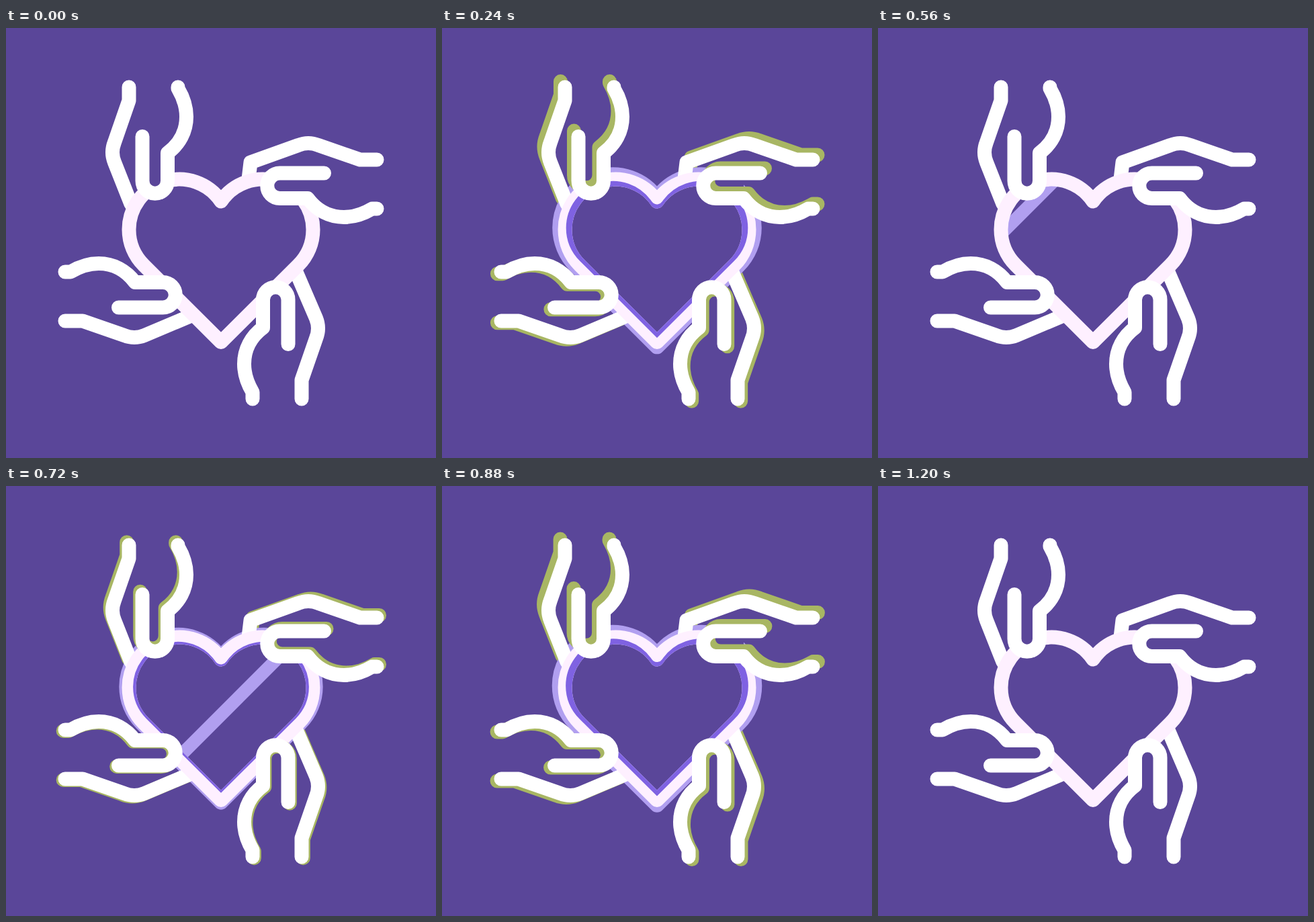
Write an HTML page that moves like this. It is 640 px wide and 640 px high and loops after 1.4 s.

```html
<!DOCTYPE html>
<html lang="en">
<head>
<meta charset="utf-8">
<title>Hands around a heart</title>
<style>
  html, body { margin: 0; width: 100%; height: 100%; overflow: hidden; background: #5a4699; }
  svg { display: block; width: 100%; height: 100%; }
  .line { fill: none; stroke-width: 21; stroke-linecap: round; stroke-linejoin: round; }
  .ghost { stroke: #a8b663; }
  .hand { stroke: #fff; }
  .pocket { fill: #5a4699; }
</style>
</head>
<body>
<svg viewBox="0 0 640 640">
  <defs>
    <path id="heart" d="M320 258A75 75 0 0 0 183 300A75 75 0 0 0 205 353L320 467.5L435 353A75 75 0 0 0 457 300A75 75 0 0 0 320 258Z"/>
    <clipPath id="inside"><use href="#heart"/></clipPath>
    <mask id="hollow" maskUnits="userSpaceOnUse" x="0" y="0" width="640" height="640">
      <use id="rim" class="line grow" href="#heart" style="fill:#fff;stroke:#000"/>
    </mask>
  </defs>
  <g id="armGhosts"></g>
  <use class="line grow echo" href="#heart" stroke="#b19ff0"/>
  <g clip-path="url(#inside)">
    <path id="shine" d="M-400 400L400 -400L413.5 -386.5L-386.5 413.5Z" fill="#b19ff0"/>
  </g>
  <g id="arms"></g>
  <use class="line" href="#heart" stroke="#fef0ff"/>
  <g mask="url(#hollow)"><use class="line echo" href="#heart" stroke="#7f62e2"/></g>
  <g id="palms"></g>
</svg>
<script>
const LOOP = 1400, STEP = 40;
const $ = id => document.getElementById(id);
const all = sel => [...document.querySelectorAll(sel)];

// One hand shape, placed four times; reach lengthens the wrist, push is the pulse direction.
const hands = [
  { place: '1 0 0 1 0 0', reach: 0, push: [-7, -9] },
  { place: '0 1 -1 0 640 13', reach: 5, push: [7.5, -7.5], bent: true },
  { place: '0 -1 1 0 0 619', reach: 6, push: [-6, 3] },
  { place: '-1 0 0 -1 623 640', reach: 8, push: [5, 3.5] }
];

const armPath = ({ reach: r, bent }) =>
  `M183 88V${108 + r}L161.5 ${170 + r}Q155.5 ${185 + r} 161.5 ${200 + r}` +
  (bent ? 'L187 276L212 279' : `L${186 + r * 0.7} ${262 + r * 2}`);

const palmPath = ({ reach: r }) =>
  `M256 88V${90 + r}Q268.5 ${111 + r} 268.5 ${132 + r}` +
  `C268.5 ${154 + r} 258 ${173 + r} 240.5 ${186 + r}` +
  `V${227.5 + r}A18.75 18.75 0 0 1 203 ${227.5 + r}V${161.5 + r}`;

const pocketPath = ({ reach: r }) =>
  `M203 ${186 + r}H240.5V${227.5 + r}A18.75 18.75 0 0 1 203 ${227.5 + r}Z`;

const placed = (h, d, cls) => `<path class="${cls}" transform="matrix(${h.place})" d="${d}"/>`;

const layer = (kind, shape) => hands.map((h, i) =>
  `<g class="${kind}" data-hand="${i}">${placed(h, shape(h), 'line')}</g>`).join('');

$('armGhosts').innerHTML = layer('ghost', armPath);
$('arms').innerHTML = layer('hand', armPath);
$('palms').innerHTML = hands.map(h => placed(h, pocketPath(h), 'pocket')).join('') +
  layer('ghost', palmPath) + layer('hand', palmPath);

const ghosts = all('.ghost'), echoes = all('.echo'), grown = all('.grow');

const ease = u => (1 - Math.cos(Math.PI * Math.min(1, Math.max(0, u)))) / 2;
const beat = (t, start, peak, end) =>
  t < peak ? ease((t - start) / (peak - start)) : ease((end - t) / (end - peak));

function draw(now) {
  const t = Math.floor(now % LOOP / STEP) * STEP;
  const p = t < 575 ? beat(t, 40, 280, 560) : beat(t, 590, 860, 1190);

  for (const g of ghosts) {
    const [x, y] = hands[g.dataset.hand].push;
    g.setAttribute('transform', `translate(${x * p} ${y * p})`);
  }
  const s = 1 + 0.06 * p;
  for (const n of grown)
    n.setAttribute('transform', `translate(320 346.5) scale(${s}) translate(-320 -346.5)`);
  $('rim').style.strokeWidth = 21 - 3.5 * p;
  for (const n of [...ghosts, ...echoes])
    n.style.visibility = p < 0.01 ? 'hidden' : 'visible';

  // The shine crosses along the falling diagonal.
  const d = (476 + (t - 560) * 1.07) / 2;
  $('shine').setAttribute('transform', `translate(${d} ${d})`);
  requestAnimationFrame(draw);
}
draw(0);
</script>
</body>
</html>
```
